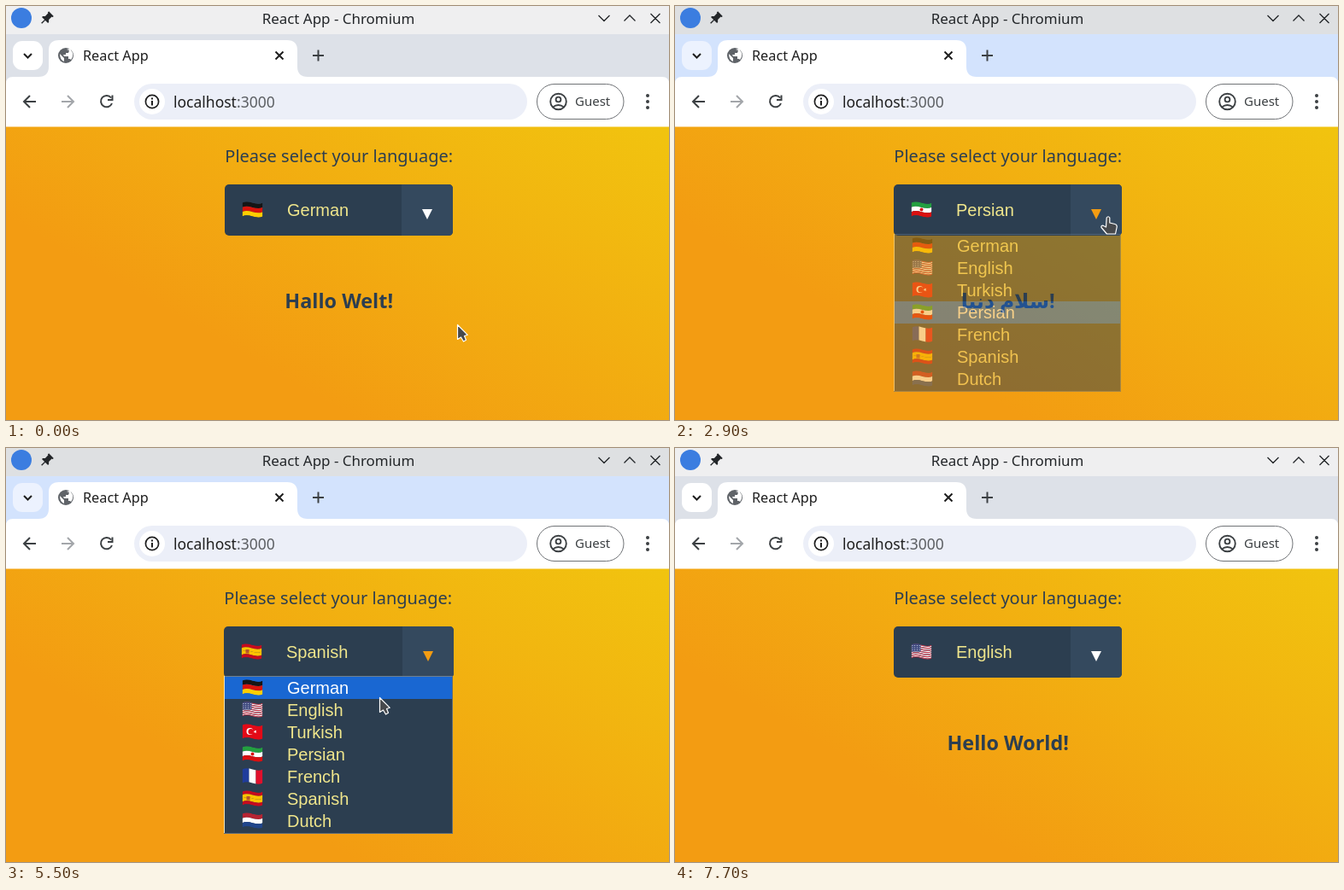
An HTML page for the animation above (7800 ms loop, 776x485 px).

```html
<!DOCTYPE html>
<html lang="en">
<head>
<meta charset="utf-8">
<title>React App</title>
<style>
  html, body { margin: 0; width: 100%; height: 100%; overflow: hidden; }
  svg { display: block; width: 776px; height: 485px; }
  text { font-family: "Noto Sans", "DejaVu Sans", sans-serif; white-space: pre; }
  .item { font: 20px "Liberation Sans", Arial, sans-serif; fill: #f0e68c; }
  .line { fill: none; stroke: #3c4043; stroke-width: 2; }
</style>
</head>
<body>
<svg viewBox="0 0 776 485">
  <defs>
    <linearGradient id="sun" gradientUnits="userSpaceOnUse" x1="216.7" y1="610" x2="559.3" y2="17">
      <stop offset=".3" stop-color="#f39c12"/>
      <stop offset="1" stop-color="#f1c40f"/>
    </linearGradient>
    <clipPath id="wave"><path d="M0 0C8-4 16 4 24 0V16C16 20 8 12 0 16Z"/></clipPath>
  </defs>

  <rect id="strip" y="33" width="776" height="60"/>
  <rect id="titleBar" width="776" height="33"/>
  <circle cx="18" cy="14" r="12" fill="#3b7de0"/>
  <g transform="translate(48 14) rotate(45)" fill="#232629">
    <path d="M-4-7H4V-5H3V0L5 2V3.5H-5V2L-3 0V-5H-4Z"/>
    <path d="M-.7 3H.7V9H-.7Z"/>
  </g>
  <text x="389" y="20.5" font-size="16.95" text-anchor="middle" fill="#232629">React App - Chromium</text>
  <path class="line" style="stroke:#232629;stroke-width:1.3" d="M693.5 11l6.5 6.5 6.5-6.5M723.5 17.5l6.5-6.5 6.5 6.5M754.5 9l11 11m0-11l-11 11"/>

  <rect id="tabSearch" x="8" y="41" width="35" height="34" rx="11"/>
  <path class="line" style="stroke:#1f1f1f" d="M21 56l4.5 4.5L30 56"/>
  <path fill="#fff" d="M0 142V91Q0 83 8 83H38Q50 83 50 71V52Q50 40 62 40H329Q341 40 341 52V71Q341 83 353 83H768Q776 83 776 91V142Z"/>
  <circle cx="70" cy="58" r="9" fill="#5f6368"/>
  <path fill="#fff" d="M63 56l5 5v4q-5-2-5-9zM71 51l3 1-1 3h-3v2h-3l1 2h5v3h2l1 1q3-4 2-8l-3-5z"/>
  <text x="90" y="64" font-size="16.25" fill="#1f1f1f">React App</text>
  <path class="line" style="stroke:#1f1f1f" d="M315.5 53.500l9 9m0-9l-9 9"/>
  <path class="line" d="M365.500 51.500v13m-6.500-6.500h13"/>

  <path class="line" d="M35 112H21.500M28 105l-7 7 7 7"/>
  <path class="line" style="stroke:#a3a6aa" d="M65 112h13.500M72 105l7 7-7 7"/>
  <path class="line" d="M123 107.500A6.700 6.700 0 1 0 124 114M124.500 104.500v5.500h-5.500"/>
  <rect x="150" y="91" width="460" height="42" rx="21" fill="#eceff8"/>
  <circle cx="171" cy="112" r="15" fill="#fff"/>
  <circle class="line" cx="171" cy="112" r="7.600" style="stroke:#1f1f1f;stroke-width:1.7"/>
  <path fill="#1f1f1f" d="M170 107.500h2v2h-2zM170 111h2v5.500h-2z"/>
  <text x="196" y="118.500" font-size="17.5" fill="#1f1f1f">localhost<tspan fill="#5a5d61">:3000</tspan></text>
  <rect x="621.500" y="91.500" width="101.500" height="41" rx="20.500" fill="#fff" stroke="#6f7276"/>
  <g class="line" style="stroke-width:1.9">
    <circle cx="646.500" cy="112" r="9.300"/>
    <circle cx="646.500" cy="109.500" r="2.900"/>
    <path d="M640 118.500q6.500-5 13 0"/>
  </g>
  <text x="666" y="117" font-size="15" fill="#3c4043">Guest</text>
  <g fill="#3c4043"><circle cx="751" cy="105" r="2"/><circle cx="751" cy="112" r="2"/><circle cx="751" cy="119" r="2"/></g>

  <rect y="141.500" width="776" height="343.500" fill="url(#sun)"/>
  <text id="label" y="183" font-size="20" text-anchor="middle" fill="#2c3e50">Please select your language:</text>
  <rect id="box" y="209" height="60" rx="5" fill="#2c3e50"/>
  <path id="boxEnd" d="M0 209H55Q60 209 60 214V264Q60 269 55 269H0Z" fill="#34495e"/>
  <path id="arrow" d="M-6 238H6L0 250Z"/>
  <g id="value"></g>
  <text id="greeting" x="389.700" y="354" font-size="23.4" font-weight="700" text-anchor="middle" fill="#2c3e50"></text>
  <g id="popup"></g>

  <g id="pointer" stroke="#fff" stroke-width="1.200" fill="#47494c" stroke-linejoin="round">
    <path id="plain" d="M.5.5V17.500L4.500 15 7.500 20 10.500 18.300 8.500 13.500 12.300 12.300Z"/>
    <path id="hand" d="M-1.800 1Q0-1.500 1.800 1V7L8 8.500Q10.500 9 10.200 12L8.500 20H-1.500L-8 12.500Q-8.500 10-6 10.200L-2.500 12Z"/>
  </g>
</svg>

<script>
const LOOP = 7800, STEP = 100, ROW = 26, LIST_TOP = 268;
const $ = id => document.getElementById(id);

// One wavy flag stripe
const band = (y, h, fill) =>
  `<path fill="${fill}" d="M0 ${y}c8-4 16 4 24 0v${h}c-8 4-16-4-24 0z"/>`;
const rows = (...colors) =>
  colors.map((c, i) => band(i * 16 / colors.length, 16 / colors.length, c)).join('');
const rect = (x, y, w, h, fill) =>
  `<rect x="${x}" y="${y}" width="${w}" height="${h}" fill="${fill}"/>`;
const disc = (x, y, r, fill) => `<circle cx="${x}" cy="${y}" r="${r}" fill="${fill}"/>`;

function usFlag() {
  const stripes = Array.from({ length: 13 }, (_, i) => i % 2 ? '#fff' : '#c8354a');
  let stars = '';
  for (let i = 0; i < 12; i++) {
    stars += disc(1.500 + i % 4 * 2.700, 1 + Math.floor(i / 4) * 2.500, .5, '#fff');
  }
  return rows(...stripes) + rect(0, -3, 11, 11, '#3f4a80') + stars;
}

const LANGS = [
  ['German', rows('#151515', '#d8140c', '#ffce00')],
  ['English', usFlag()],
  ['Turkish', rows('#e30a17') + disc(9, 7.600, 4, '#fff') + disc(10.200, 7.700, 3.200, '#e30a17') +
    '<path fill="#fff" d="M13 8l4-1.700-2.500 3.500v-4l2.500 3.500z"/>'],
  ['Persian', rows('#239f40', '#fff', '#da1010') + disc(12, 8, 2, '#da1010')],
  ['French', rect(0, -4, 8, 24, '#1f3c9c') + rect(8, -4, 8, 24, '#fff') + rect(16, -4, 8, 24, '#e1102c')],
  ['Spanish', rows('#c60b1e', '#ffc400', '#ffc400', '#c60b1e') + rect(5, 5.500, 4, 4.500, '#b5552b')],
  ['Dutch', rows('#b52332', '#fff', '#21468b')]
];

const entry = ([name, flag], x, y) =>
  `<g transform="translate(${x} ${y - 8})"><g clip-path="url(#wave)">${flag}</g></g>` +
  `<text class="item" x="${x + 52.500}" y="${y + 7}">${name}</text>`;

// Pointer path: time, x, y
const PATH = [
  [0, 528, 373], [50, 528, 373], [400, 514, 266], [700, 507, 249], [800, 507, 249],
  [900, 498, 264], [1100, 452, 332], [1400, 443, 362], [1600, 443, 362], [2000, 508, 268],
  [2300, 507, 249], [2600, 507, 249], [2700, 507, 247], [2900, 507, 247], [3100, 496, 276],
  [3600, 428, 412], [3900, 428, 412], [4300, 492, 290], [4600, 504, 237], [4800, 504, 238],
  [5200, 464, 274], [5500, 437, 292], [5700, 425, 319], [5900, 425, 319], [6200, 416, 308],
  [6700, 416, 308], [6800, 410, 299], [7100, 240, 156], [7400, 54, 3], [7500, 54, -30], [LOOP, 54, -30]
];

// Each visit to the list: opened, chosen, time the pointer leaves, old and new language
const VISITS = [
  { open: 600, pick: 1600, leave: 1700, from: 0, to: 3, hello: 'سلام دنیا!' },
  { open: 2900, pick: 3900, leave: 4000, from: 3, to: 5, hello: '¡Hola Mundo!' },
  { open: 4700, pick: 6000, leave: 6800, from: 5, to: 1, hello: 'Hello World!' }
];
const FADE = [.9, .45, .12, .12, .08];

function pointerAt(t) {
  const i = Math.max(1, PATH.findIndex(p => p[0] >= t));
  const [t0, x0, y0] = PATH[i - 1], [t1, x1, y1] = PATH[i];
  const k = Math.max(0, (t - t0) / (t1 - t0));
  return [x0 + (x1 - x0) * k, y0 + (y1 - y0) * k];
}

const overBox = ([x, y]) => x > 256 && x < 523 && y >= 209 && y < 269;

function mix(a, b, k) {
  return `rgb(${a.map((v, i) => Math.round(v + (b[i] - v) * k))})`;
}

function drawPopup(visit, t, left, width) {
  const popup = $('popup');
  let alpha = 0;
  if (visit && t < visit.pick) alpha = t < visit.open + STEP ? .5 : 1;
  else if (visit) alpha = FADE[(t - visit.pick) / STEP] || 0;
  popup.setAttribute('opacity', alpha);
  if (!alpha) return;

  const y = pointerAt(t)[1];
  const hover = y < LIST_TOP ? visit.from : Math.floor((y - LIST_TOP) / ROW);
  const active = t < visit.pick ? hover : visit.to;
  let out = rect(left, 267, width, 185, '#2c3e50') +
    rect(left + 1, LIST_TOP + active * ROW, width - 1.500, ROW, '#1967d2') +
    rect(left, 267, width, 1, '#70808c') + rect(left, 267, 1, 185, '#e9e3bd') +
    rect(left + width - 1, 267, 1, 185, '#5f6d78') + rect(left, 451, width, 1, '#5f6d78');
  LANGS.forEach((lang, i) => {
    const item = entry(lang, left + 21.500, LIST_TOP + 12.500 + i * ROW);
    out += i === active ? item.replace('class="item"', 'class="item" style="fill:#fff"') : item;
  });
  popup.innerHTML = out;
}

function draw(time) {
  const t = Math.floor(time % LOOP / STEP) * STEP;
  const past = VISITS.filter(v => t >= v.pick).pop();
  const visit = VISITS.filter(v => t >= v.open).pop();
  const current = past ? past.to : 0;
  const wide = current === 5 ? 1 : 0;
  const left = 256 - wide;

  const focus = t < 500 || t >= 7700 ? 0 : t === 500 || t === 7600 ? .5 : 1;
  $('titleBar').setAttribute('fill', mix([239, 239, 240], [222, 224, 226], focus));
  $('strip').setAttribute('fill', mix([221, 225, 232], [211, 227, 253], focus));
  $('tabSearch').setAttribute('fill', mix([255, 255, 255], [236, 242, 254], focus));

  $('label').setAttribute('x', 389.700 - wide);
  $('box').setAttribute('x', left);
  $('box').setAttribute('width', 267 + 2 * wide);
  $('boxEnd').setAttribute('transform', `translate(${463 + wide} 0)`);
  $('value').innerHTML = entry(LANGS[current], left + 20.500, 238.500);
  $('greeting').textContent = past ? past.hello : 'Hallo Welt!';

  const held = visit && t < visit.leave;
  const hot = held || overBox(pointerAt(Math.max(0, t - STEP)));
  $('arrow').setAttribute('transform', `translate(${493 + wide} 0)`);
  $('arrow').setAttribute('fill', hot ? '#f39c12' : '#fff');
  drawPopup(visit, t, left, 266 + 2 * wide);

  const spot = pointerAt(t), hand = overBox(spot);
  $('pointer').setAttribute('transform', `translate(${spot.map(Math.round)})`);
  $('hand').style.display = hand ? '' : 'none';
  $('plain').style.display = hand ? 'none' : '';
}

const start = performance.now();
function tick() {
  draw(performance.now() - start);
  requestAnimationFrame(tick);
}
tick();
</script>
</body>
</html>
```
